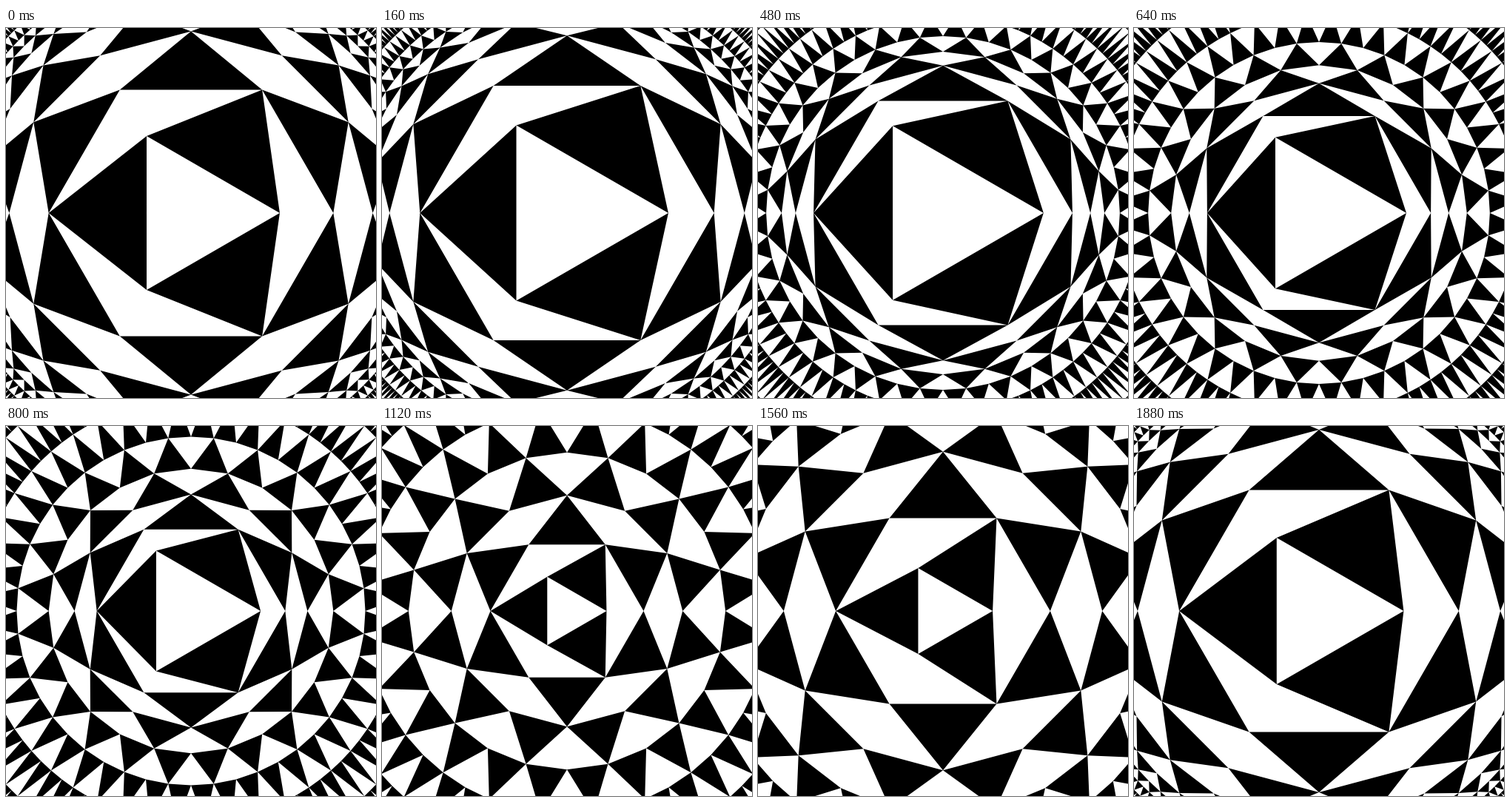
An HTML page with a canvas that plays this animation: 500x500 px, repeating every 1920 ms.

```html
<!DOCTYPE html>
<html lang="en">
<head>
<meta charset="utf-8">
<title>Breathing triangle rings</title>
<style>
html, body { margin: 0; width: 100%; height: 100%; overflow: hidden; background: #fff; }
canvas { display: block; }
</style>
</head>
<body>
<canvas id="stage" width="500" height="500"></canvas>
<script>
const ctx = document.getElementById('stage').getContext('2d');
const LOOP = 1920, STEP = 40, CENTER = 250, UNIT = 95.2, RINGS = 10;

// Each ring swells and shrinks half a radian ahead of the one inside it.
const radius = (ring, phase) =>
  UNIT * (ring ** (2 / 3) + 0.5 * Math.cos(phase + 0.5 * ring - 1.524));

const point = (r, angle) => [CENTER + r * Math.cos(angle), CENTER + r * Math.sin(angle)];

function draw(time) {
  const phase = 2 * Math.PI * time / LOOP;
  ctx.fillStyle = '#fff';
  ctx.fillRect(0, 0, 500, 500);
  ctx.fillStyle = '#000';
  ctx.beginPath();
  // Every side of a ring carries a triangle whose tip lies on the next ring.
  for (let ring = 1; ring <= RINGS; ring++) {
    const sides = 3 * 2 ** (ring - 1);
    const turn = 2 * Math.PI / sides;
    const inner = radius(ring, phase), outer = radius(ring + 1, phase);
    for (let i = 0; i < sides; i++) {
      ctx.moveTo(...point(inner, i * turn));
      ctx.lineTo(...point(outer, (i + 0.5) * turn));
      ctx.lineTo(...point(inner, (i + 1) * turn));
      ctx.closePath();
    }
  }
  ctx.fill();
}

const start = performance.now();
function tick() {
  const time = (performance.now() - start) % LOOP;
  draw(Math.floor(time / STEP) * STEP);
  requestAnimationFrame(tick);
}
tick();
</script>
</body>
</html>
```
